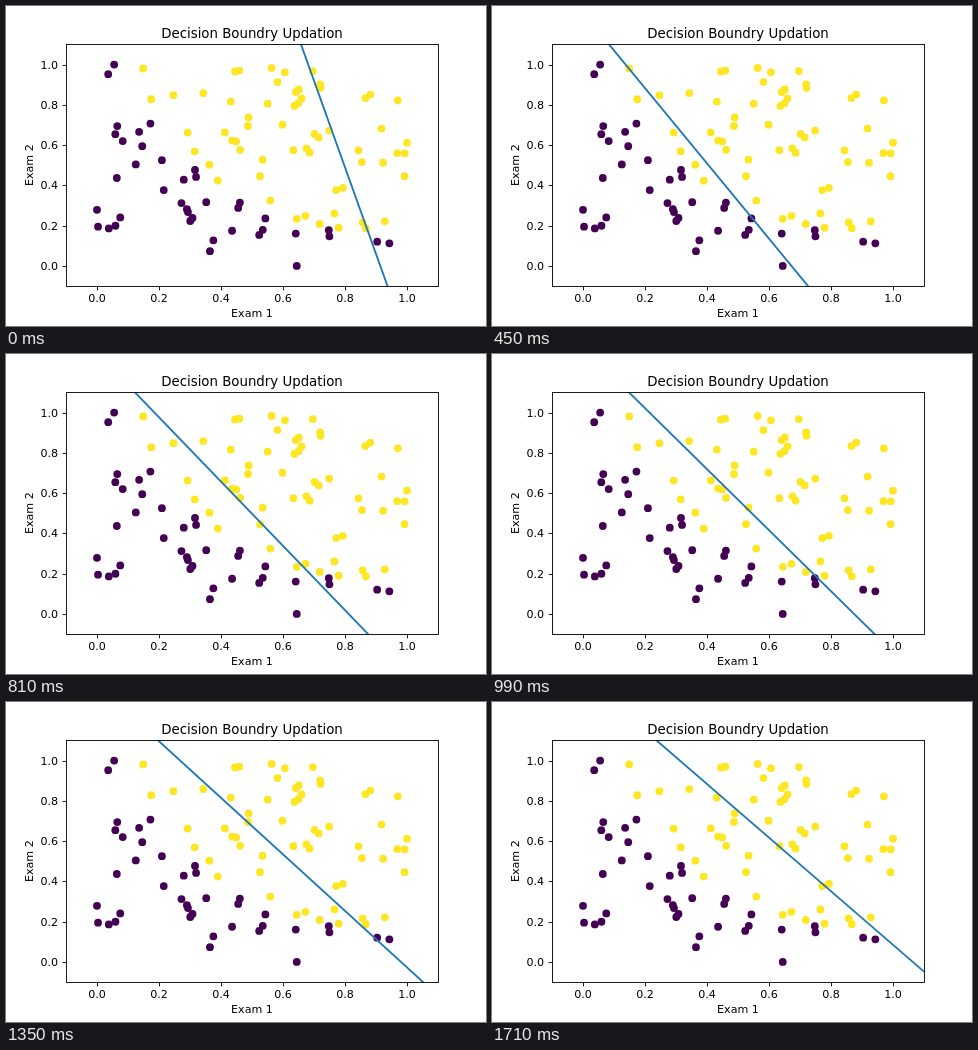
Recreate the animation shown at these times as an HTML page. Size 480 by 320 pixels, loop 1800 ms.

```html
<!DOCTYPE html>
<html>
<head>
<meta charset="utf-8">
<style>
html, body { margin: 0; width: 100%; height: 100%; overflow: hidden; background: #fff; }
svg { display: block; font: 11.11px "DejaVu Sans", sans-serif; }
</style>
</head>
<body>
<svg id="chart" width="480" height="320" viewBox="0 0 480 320">
  <clipPath id="area"><rect x="60" y="38.4" width="372" height="241.6"/></clipPath>
  <g id="points"></g>
  <path id="boundary" clip-path="url(#area)" fill="none" stroke="#1f77b4" stroke-width="1.85"/>
  <g id="axes" stroke="#000" stroke-width=".89" fill="none">
    <rect x="60.5" y="38.5" width="372" height="242"/>
  </g>
  <g id="labels"></g>
</svg>
<script>
const LEFT = 60, TOP = 38.4, WIDTH = 372, HEIGHT = 241.6, BOTTOM = TOP + HEIGHT;
const STEP_MS = 90;

// Pairs of exam scores
const admitted = [
  60.18,86.31, 79.03,75.34, 61.11,96.51, 75.02,46.55, 76.10,87.42, 84.43,43.53,
  82.31,76.48, 69.36,97.72, 53.97,89.21, 69.07,52.74, 70.66,92.93, 76.98,47.58,
  89.68,65.80, 77.92,68.97, 62.27,69.95, 80.19,44.82, 61.38,72.81, 85.40,57.05,
  52.05,69.43, 64.18,80.91, 83.90,56.31, 94.44,65.57, 77.19,70.46, 97.77,86.73,
  62.07,96.77, 91.56,88.70, 79.94,74.16, 99.27,61.00, 90.55,43.39, 97.65,68.86,
  74.25,69.82, 71.80,78.45, 75.40,85.76, 40.46,97.54, 80.28,92.12, 66.75,60.99,
  64.04,78.03, 72.35,96.23, 60.46,73.09, 58.84,75.86, 99.83,72.37, 47.26,88.48,
  50.46,75.81, 88.91,69.80, 94.83,45.69, 67.32,66.59, 57.24,59.51, 80.37,90.96,
  68.47,85.59, 75.48,90.42, 78.64,96.65, 94.09,77.16, 90.45,87.51, 74.49,84.85,
  89.85,45.36, 83.49,48.38, 42.26,87.10, 99.32,68.78, 55.34,64.93, 74.78,89.53
];
const rejected = [
  34.62,78.02, 30.29,43.89, 35.85,72.90, 45.08,56.32, 95.86,38.23, 75.01,30.60,
  39.54,76.04, 67.95,46.68, 67.37,42.84, 50.53,48.86, 34.21,44.21, 93.11,38.80,
  61.83,50.26, 38.79,64.99, 52.11,63.13, 40.24,71.17, 54.64,52.21, 33.92,98.87,
  74.79,41.57, 34.18,75.24, 51.55,46.86, 82.37,40.62, 51.05,45.82, 62.22,52.06,
  34.52,60.40, 50.29,49.80, 49.59,59.81, 32.58,95.60, 35.29,47.02, 56.25,39.26,
  30.06,49.59, 44.67,66.45, 66.56,41.09, 49.07,51.88, 32.72,43.31, 60.46,42.51,
  82.23,42.72, 42.08,78.84, 52.35,60.77, 55.48,35.57
];

// Where the boundary meets the top and bottom of the plot after each update
const topX = [295, 184, 146, 129, 121, 117, 118, 121, 125, 129,
  133, 137, 141, 145, 148.6, 152, 155.3, 158.5, 161.6, 164.5];
const bottomX = [381.5, 314, 302, 303, 308, 316, 327, 339, 351, 362,
  372.5, 382.5, 392, 401, 409.2, 417, 424.2, 431.1, 437.7, 444];

const $ = id => document.getElementById(id);
const px = x => LEFT + (x + 0.1) / 1.2 * WIDTH;
const py = y => BOTTOM - (y + 0.1) / 1.2 * HEIGHT;
const snap = v => Math.floor(v + 0.5) + 0.5;

function add(parent, tag, attrs, text = "") {
  const el = document.createElementNS("http://www.w3.org/2000/svg", tag);
  for (const name in attrs) el.setAttribute(name, attrs[name]);
  el.textContent = text;
  $(parent).append(el);
}

function label(text, x, y, extra = {}) {
  add("labels", "text", { x, y, "text-anchor": "middle", ...extra }, text);
}

function scatter(scores, fill) {
  for (let i = 0; i < scores.length; i += 2) {
    const cx = px((scores[i] - 30.0588) / 69.7691);
    const cy = py((scores[i + 1] - 30.6033) / 68.2661);
    add("points", "circle", { cx, cy, r: 3.89, fill });
  }
}

scatter(admitted, "#fde725");
scatter(rejected, "#440154");

for (let i = 0; i <= 5; i++) {
  const v = i / 5, x = px(v), y = py(v);
  add("axes", "path", { d: `M${snap(x)} 280.5v3.9M60.5 ${snap(y)}h-3.9` });
  label(v.toFixed(1), x, 296);
  label(v.toFixed(1), 52.2, y + 4.1, { "text-anchor": "end" });
}
label("Exam 1", 246, 311);
label("Exam 2", 0, 0, { transform: "translate(27 159.2) rotate(-90)" });
label("Decision Boundry Updation", 246, 32, { "font-size": 13.33 });

function draw() {
  const step = Math.floor(performance.now() / STEP_MS) % topX.length;
  const a = topX[step], b = bottomX[step];
  // Extended past both edges, then clipped to the plot
  $("boundary").setAttribute("d",
    `M${2 * a - b} ${TOP - HEIGHT}L${2 * b - a} ${BOTTOM + HEIGHT}`);
  requestAnimationFrame(draw);
}
draw();
</script>
</body>
</html>
```
